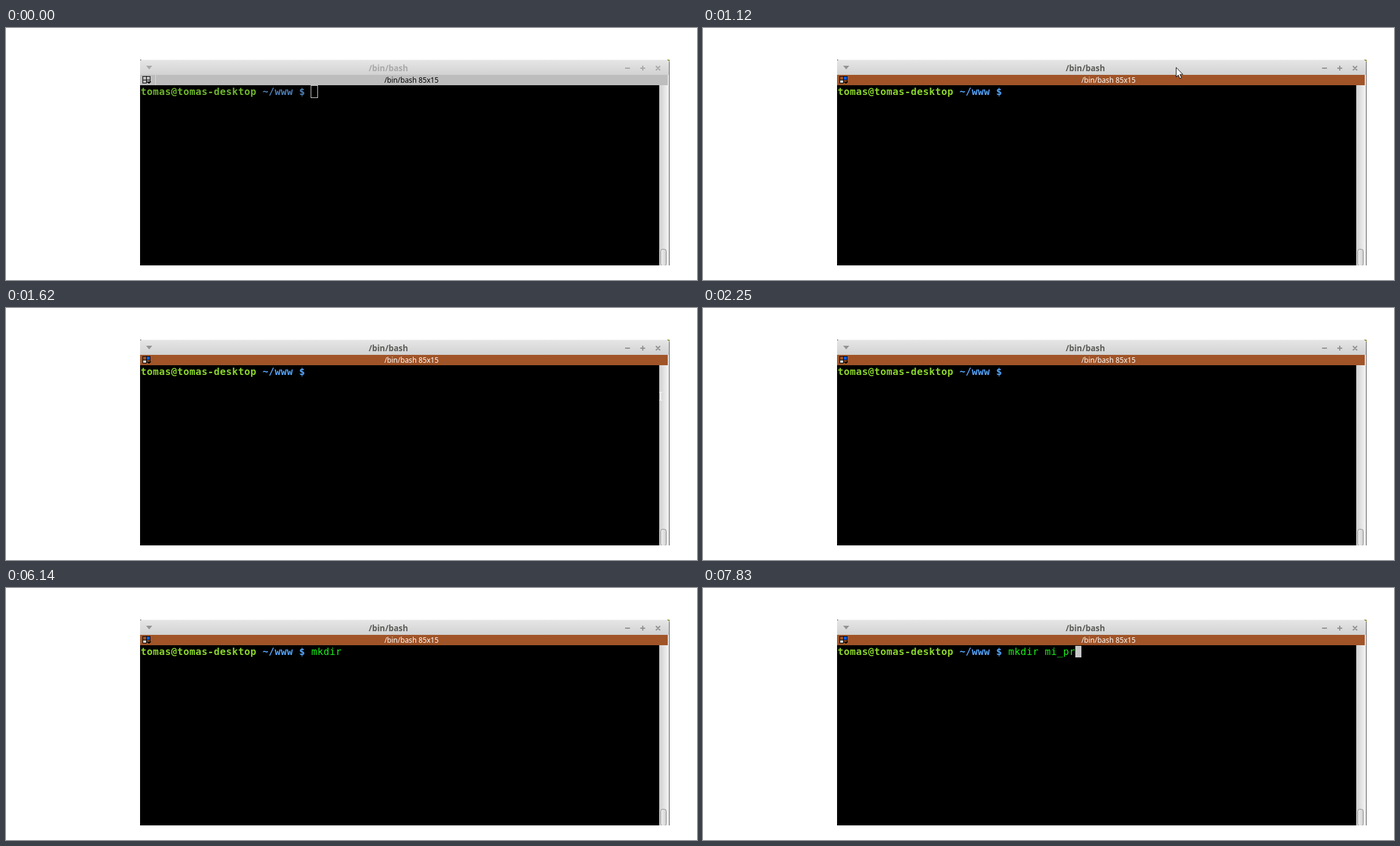
Animation of 1134x414 px, one loop 8000 ms. Source, as an HTML page:

```html
<!DOCTYPE html>
<html lang="es">
<head>
<meta charset="utf-8">
<title>Terminal</title>
<style>
html, body { margin: 0; width: 100%; height: 100%; overflow: hidden; background: #fff; }
svg { display: block; }
text { white-space: pre; }
.ui { font-family: "Noto Sans", sans-serif; text-anchor: middle; }
.mono { font: 16px "DejaVu Sans Mono", monospace; letter-spacing: .368px; }
.bold { font-weight: bold; }
.crisp { shape-rendering: crispEdges; }

svg { --title: #a9a9a9; --button: #a8a8a8; --tab: #bebdbd; --label: #000; --user: #6eb42a; --path: #4f7fb5;
      --pane1: #bebdbd; --pane2: #bebdbd; --pane3: #bebdbd; }
svg.active { --title: #5b5b57; --button: #929292; --tab: #a05428; --label: #fff; --user: #8ad42a; --path: #55a5fb;
      --pane1: #a05428; --pane2: #0b5ee0; --pane3: #d2d2d2; }
</style>
</head>
<body>
<svg id="stage" width="1134" height="414" viewBox="0 0 1134 414">
  <defs>
    <linearGradient id="bar" x2="0" y2="1"><stop stop-color="#e5e5e5"/><stop offset="1" stop-color="#d2d2d2"/></linearGradient>
    <linearGradient id="track"><stop stop-color="#cfcfcf"/><stop offset="1" stop-color="#f1f1f1"/></linearGradient>
    <linearGradient id="thumb"><stop stop-color="#eee"/><stop offset="1" stop-color="#d2d2d2"/></linearGradient>
    <clipPath id="window"><path d="M220 52H1089V390H220Z"/></clipPath>
  </defs>
  <g clip-path="url(#window)">
    <g class="crisp">
      <path fill="#eee" d="M220 52H1089V390H220Z"/>
      <path fill="url(#bar)" d="M220 53H1088V77H220Z"/>
      <path fill="#555" d="M220 52h2v1h-2zM1088 55h1v335h-1z"/>
      <path fill="#8a8a3a" d="M1085 52h4v4h-1v-2h-1v-1h-2z"/>
      <path fill="var(--tab)" d="M220 77H1086V94H220Z"/>
      <path d="M220 94H1072V390H220Z"/>
      <path fill="url(#track)" d="M1072 94H1086V390H1072Z"/>
      <path id="divider" fill="#d8d8d8" d="M245 77h1v17h-1z"/>
    </g>
    <rect x="1074.5" y="363.5" width="9" height="27" rx="3" fill="url(#thumb)" stroke="#8c8c8c"/>

    <path fill="var(--button)" d="M230 62h10l-5 6z"/>
    <path fill="none" stroke="var(--button)" stroke-width="2" d="M1016 66h8M1041 66h8M1045 62v8M1066.5 62.5l7 7M1073.5 62.5l-7 7"/>

    <g class="crisp">
      <path d="M224 79h13v7h-6v5h-7z"/>
      <path fill="var(--pane1)" d="M225 80h5v5h-5z"/>
      <path fill="var(--pane2)" d="M231 80h5v5h-5z"/>
      <path fill="var(--pane3)" d="M225 86h5v4h-5z"/>
      <path d="M236 85h1v3h-1zM231 88h7v1h-1v1h-1v1h-3v-1h-1v-1h-1z"/>
    </g>

    <text class="ui bold" x="627.5" y="71" font-size="13.4" fill="var(--title)">/bin/bash</text>
    <text class="ui" x="665.5" y="90" font-size="11.75" fill="var(--label)">/bin/bash 85x15</text>

    <text class="mono bold" x="221" y="110" fill="var(--user)">tomas@tomas-desktop</text>
    <text class="mono bold" x="421" y="110" fill="var(--path)">~/www $</text>
    <text class="mono" id="command" x="501" y="110" fill="#18f018"></text>
    <rect class="crisp" id="hollow" x="500.5" y="94.5" width="11" height="20" fill="none" stroke="#d0d0d0"/>
    <rect class="crisp" id="block" y="95" width="10" height="19" fill="#c8c8c8"/>

    <path id="arrow" fill="#fff" stroke="#111" d="M.5 .8V16.4L4 13.2L6.6 19L9.2 17.8L6.7 12.2H11.5Z"/>
    <path id="beam" class="crisp" fill="#fff" d="M-2-7h2v1h1v-1h2v1h-2v12h2v1h-2v-1h-1v1h-2v-1h2v-12h-2z"/>
  </g>
</svg>
<script>
const LOOP = 8000;
const $ = id => document.getElementById(id);
const show = (id, on) => $(id).style.display = on ? "" : "none";

// [start, typed text, block cursor visible]
const states = [
  [0, "", false], [530, "", true], [1120, "", false], [1660, "", true], [2250, "", false],
  [5150, "mk", true], [5410, "mkdi", true], [6140, "mkdir ", false],
  [6770, "mkdir m", true], [7340, "mkdir mi_", true], [7830, "mkdir mi_pr", true]
];

// The pointer moves every 40 ms: a quick sweep, then a slow drift to the scrollbar.
function pointerAt(t) {
  const step = Math.max(0, Math.floor((t - 1260) / 40));
  if (step <= 3) return [776 + 78 * step, 64 + 25 * step];
  const ease = 1 - (1 - (step - 3) / 6) ** 2;
  return [1010 + 64 * ease, 139 + 6 * ease];
}

function draw(t) {
  const active = t >= 530;
  const [, text, cursorOn] = states.findLast(s => s[0] <= t);
  $("stage").classList.toggle("active", active);
  show("divider", !active);
  show("hollow", !active);
  show("block", cursorOn);
  $("command").textContent = text;
  $("block").setAttribute("x", 501 + 10 * text.length);

  const [x, y] = pointerAt(t);
  const visible = active && t < 1660;
  const overText = y >= 94;
  show("arrow", visible && !overText);
  show("beam", visible && overText);
  const place = `translate(${Math.round(x)} ${Math.round(y)})`;
  $("arrow").setAttribute("transform", place);
  $("beam").setAttribute("transform", place);
}

const start = performance.now();
function tick() {
  draw((performance.now() - start) % LOOP);
  requestAnimationFrame(tick);
}
tick();
</script>
</body>
</html>
```
